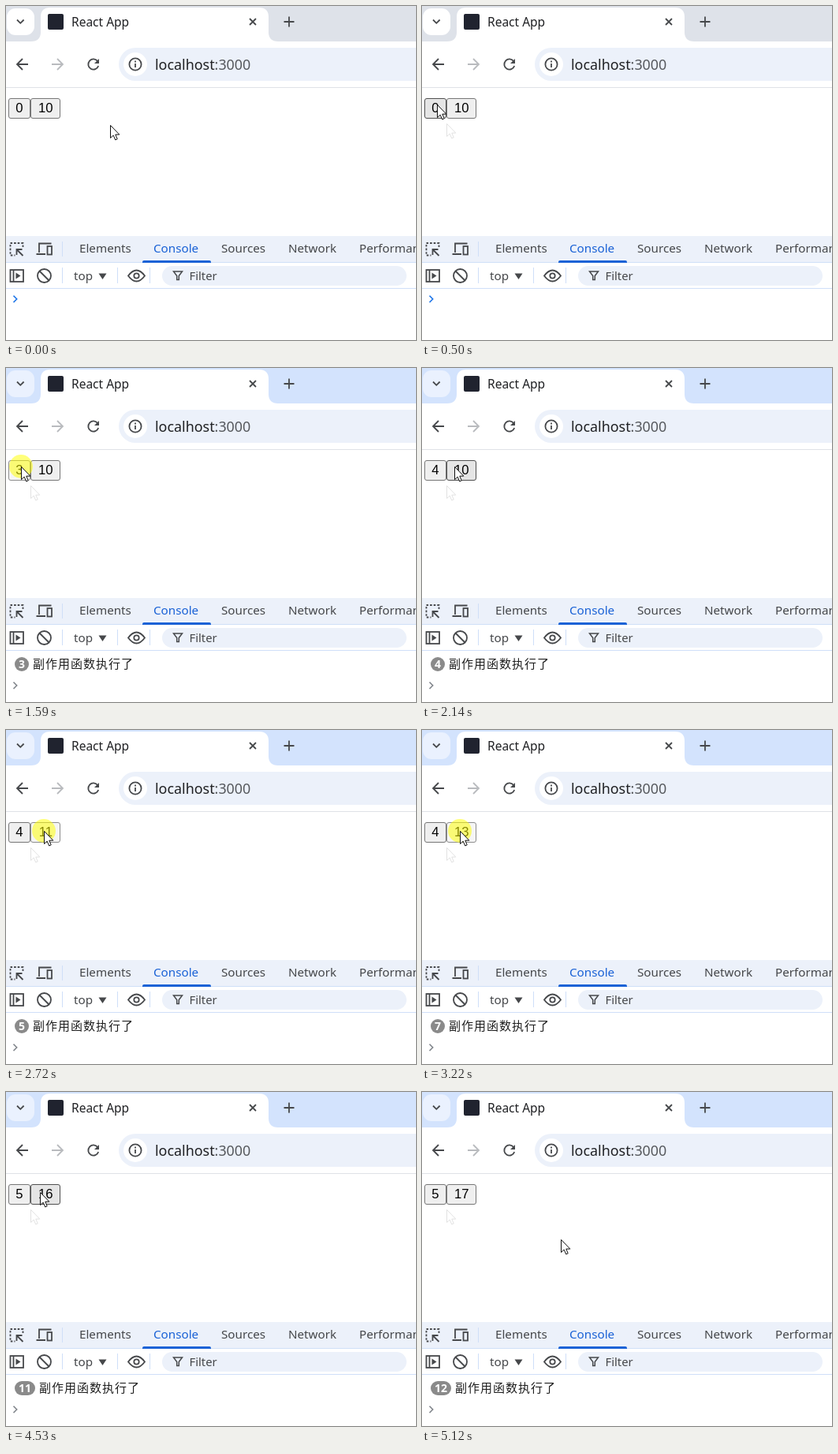
An HTML page that plays this animation: 520 px wide and 424 px high, repeating every 5.75 s.

```html
<!DOCTYPE html>
<html lang="en">
<head>
<meta charset="utf-8">
<title>Effect counter</title>
<style>
  html, body { margin: 0; width: 100%; height: 100%; overflow: hidden; background: #fff; }
  svg { display: block; width: 520px; height: 424px; }
  text { font: 15.2px "Noto Sans", "Open Sans", sans-serif; fill: #202124; }
  .tools text { fill: #45474a; }
  .tools .on { fill: #1a62d6; }
  .icon { fill: none; stroke: #46484b; stroke-width: 1.8; }
  .solid { fill: #46484b; }
  .rule { stroke: #cfdff8; }
  .button rect { fill: #efefef; stroke: #767676; }
  .button text { font: 16.67px "Liberation Sans", Arial, sans-serif; fill: #000; text-anchor: middle; }
  .button.hover rect { fill: #e5e5e5; stroke: #4f4f4f; }
  .button.active rect { fill: #f5f5f5; stroke: #8d8d8d; }
  #message { font: 15px "Noto Sans CJK SC", "Noto Sans CJK", sans-serif; letter-spacing: 1px; fill: #1f1f1f; }
  #badge text { font-size: 14px; font-weight: 700; fill: #fff; text-anchor: middle; }
</style>
</head>
<body>
<svg viewBox="0 0 520 424">
  <defs>
    <path id="arrow" d="M.5 .5V16.6L4.2 13.2 6.7 19 9.2 17.9 6.8 12.2H11.8Z"/>
  </defs>
  <rect width="520" height="424" fill="#fff"/>

  <!-- tab strip -->
  <rect id="strip" width="520" height="45"/>
  <rect id="menu" x="1" y="3" width="35" height="34" rx="11"/>
  <path class="icon" d="M14 17.5l4.3 4.3 4.3-4.3"/>
  <path d="M32 45Q44 45 44 33V14Q44 2 56 2H321Q333 2 333 14V33Q333 45 345 45Z" fill="#fff"/>
  <rect x="53" y="10" width="20" height="20" rx="2" fill="#20232f"/>
  <text x="83" y="26" style="font-size:15.5px">React App</text>
  <path class="icon" d="M309 16l8 8m0-8l-8 8M352.5 20h13M359 13.5v13"/>

  <!-- address bar -->
  <path class="icon" d="M28 74H14.5M21 67l-7 7 7 7"/>
  <path class="icon" d="M58 74H71.5M65 67l7 7-7 7" style="stroke:#b9bbbe"/>
  <path class="icon" d="M116.3 70.2A6.6 6.6 0 1 0 117.2 76"/>
  <path class="solid" d="M118 67v6h-6z"/>
  <rect x="143" y="53" width="400" height="42" rx="21" fill="#ecf1fa"/>
  <circle cx="164" cy="74" r="15" fill="#fff"/>
  <circle class="icon" cx="164" cy="74" r="7.6"/>
  <path class="icon" d="M164 73v5m0-8.5v2"/>
  <text x="189" y="80.5" style="font-size:17.9px">localhost<tspan fill="#55585c">:3000</tspan></text>
  <path d="M0 103.5H520" stroke="#dfe2e7"/>

  <!-- page -->
  <g class="button" id="first">
    <rect x="3.5" y="117.5" width="27" height="25" rx="2.5"/>
    <text x="17" y="135"></text>
  </g>
  <g class="button" id="second">
    <rect x="31.5" y="117.5" width="37" height="25" rx="2.5"/>
    <text x="50.3" y="135"></text>
  </g>

  <!-- developer tools -->
  <rect y="292" width="520" height="33" fill="#ecf1fa"/>
  <path class="rule" d="M0 325.5H520M0 358.5H520M71.5 299v19m0 14v20m70-20v20m41-20v20"/>
  <path d="M173 326v-1q0-2 2-2h83q2 0 2 2v1z" fill="#1a62d6"/>
  <g class="icon">
    <path d="M21.5 306v-5h-16v15.500h6" stroke-dasharray="2.6 2"/>
    <path d="M21.5 317l-8-8m0 7v-7h7"/>
    <path d="M57.5 301.5H42V313M38.5 315H50"/>
    <rect x="52.5" y="305" width="5.5" height="10.5"/>
    <rect x="5.5" y="335" width="16.5" height="15"/>
    <path d="M9.5 335v15"/>
    <circle cx="48.5" cy="342.5" r="8.5"/>
    <path d="M42.5 336.5l12 12"/>
    <path d="M155 342.5q10.500-14 21 0q-10.500 14-21 0z"/>
    <circle cx="165.5" cy="342.5" r="3.2"/>
    <path d="M212.5 337h11l-4.200 5.500v5h-2.600v-5z" style="stroke-width:1.5"/>
  </g>
  <path class="solid" d="M12.5 338.5v8l6-4zM117.5 339.5h10l-5 7.5z"/>
  <rect x="198" y="330" width="310" height="25" rx="12.5" fill="#ecf1fa"/>
  <path class="icon" d="M212.5 337h11l-4.200 5.500v5h-2.600v-5z" style="stroke-width:1.5"/>
  <g class="tools">
    <text x="93" y="313">Elements</text>
    <text x="187" y="313" class="on">Console</text>
    <text x="273" y="313">Sources</text>
    <text x="358" y="313">Network</text>
    <text x="448" y="313">Performance</text>
    <text x="86" y="348">top</text>
    <text x="232.5" y="348" style="font-size:14.8px">Filter</text>
  </g>

  <!-- console -->
  <g id="badge">
    <rect x="11" y="367" height="18" rx="9" fill="#8a8a8a"/>
    <text y="381"></text>
  </g>
  <text id="message" y="381">副作用函数执行了</text>
  <path id="prompt" d="M9.5-4.2l4.2 4.2-4.2 4.2" fill="none" stroke-width="1.6"/>

  <!-- pointer -->
  <use id="trail" href="#arrow" x="31" y="149" fill="#fff" stroke="#e2e2e2"/>
  <circle id="halo" r="15" fill="#ff0" fill-opacity=".52"/>
  <use id="pointer" href="#arrow" fill="#fff" stroke="#111"/>
</svg>
<script>
  const LOOP = 5750;
  const FOCUS = 650;
  const HOME = { x: 132, y: 151 };

  // press, count and release times for each button
  const firstClicks = [
    [650, 720, 720], [1150, 1210, 1300], [1520, 1580, 1650],
    [1930, 2000, 2070], [3740, 3870, 3950]
  ];
  const secondClicks = [
    [2350, 2500, 2500], [2720, 2870, 3000], [3150, 3220, 3370], [3440, 3520, 3600],
    [4170, 4240, 4240], [4460, 4530, 4530], [4750, 4820, 4900]
  ];

  // each move jumps in equal time steps along an eased, optionally bent line
  const moves = [
    { at: 70, until: 500, steps: 7, x: 19, y: 125, bend: 19 },
    { at: 2070, until: 2140, steps: 2, x: 41, y: 125 },
    { at: 2290, until: 2290, steps: 1, x: 48, y: 128 },
    { at: 3600, until: 3740, steps: 3, x: 21, y: 129 },
    { at: 3950, until: 4100, steps: 3, x: 43, y: 127 },
    { at: 4900, until: 5120, steps: 4, x: 176, y: 187 }
  ];

  const $ = id => document.getElementById(id);
  const set = (el, attrs) => {
    for (const name in attrs) el.setAttribute(name, attrs[name]);
  };
  const show = (id, on) => { $(id).style.display = on ? '' : 'none'; };
  const clicked = (clicks, time) => clicks.filter(([, count]) => time >= count).length;
  const held = time => [...firstClicks, ...secondClicks]
    .some(([press, , release]) => time >= press && time < release);

  function pointerAt(time) {
    let from = HOME;
    for (const move of moves) {
      const { at, until, steps, x, y, bend = 0 } = move;
      if (time < at) break;
      if (time < until) {
        const gap = (until - at) / (steps - 1);
        const p = (Math.floor((time - at) / gap) + 1) / steps;
        const eased = 1 - (1 - p) ** 1.8;
        return {
          x: Math.round(from.x + (x - from.x) * eased),
          y: Math.round(from.y + (y - from.y) * p + bend * Math.sin(Math.PI * p))
        };
      }
      from = move;
    }
    return from;
  }

  function drawButton(id, left, right, count, { x, y }, pressed) {
    const over = x >= left && x < right && y >= 117 && y < 143;
    set($(id), { class: 'button ' + (over ? (pressed ? 'active' : 'hover') : '') });
    $(id).lastElementChild.textContent = count;
  }

  function draw(time) {
    const focused = time >= FOCUS;
    const pressed = held(time);
    const pointer = pointerAt(time);
    const first = clicked(firstClicks, time);
    const second = clicked(secondClicks, time);
    const logs = first + second;
    const wide = logs > 9;

    set($('strip'), { fill: focused ? '#d3e3fd' : '#dee2e9' });
    set($('menu'), { fill: focused ? '#eaf1fe' : '#fff' });
    drawButton('first', 3, 31, first, pointer, pressed);
    drawButton('second', 31, 69, 10 + second, pointer, pressed);

    show('message', logs > 0);
    show('badge', logs > 1);
    set($('message'), { x: logs < 2 ? 28 : wide ? 42 : 34 });
    const [pill, label] = $('badge').children;
    set(pill, { width: wide ? 26 : 18 });
    set(label, { x: wide ? 24 : 20 });
    label.textContent = logs;
    set($('prompt'), {
      transform: `translate(0 ${logs ? 403 : 372})`,
      stroke: focused ? '#80858b' : '#1a73e8'
    });

    show('trail', time >= 430);
    show('halo', pressed);
    set($('halo'), { cx: pointer.x, cy: pointer.y });
    set($('pointer'), { x: pointer.x, y: pointer.y });
  }

  const start = performance.now();
  function tick() {
    draw((performance.now() - start) % LOOP);
    requestAnimationFrame(tick);
  }
  tick();
</script>
</body>
</html>
```
